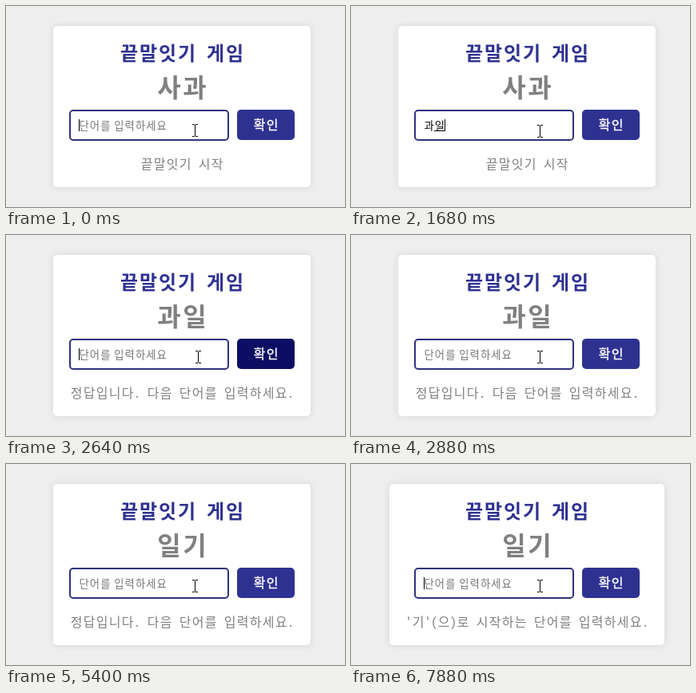
Animation, 424 px wide and 252 px high, one loop 8000 ms. Source, as an HTML page with a canvas:

```html
<!DOCTYPE html>
<html lang="ko">
<head>
<meta charset="utf-8">
<title>끝말잇기 게임</title>
<style>
html, body { margin: 0; width: 100%; height: 100%; overflow: hidden; background: #eee; }
canvas { display: block; }
</style>
</head>
<body>
<canvas id="stage" width="424" height="252"></canvas>
<script>
const ctx = document.getElementById('stage').getContext('2d');
const LOOP = 8000;
const MONO = '"Noto Sans Mono CJK KR", "Noto Sans CJK KR", "Noto Sans CJK", monospace';
const FIELD = '"Liberation Sans", ' + MONO;
const FIELD_SIZE = 40 / 3;
const FIELD_X = 91;
const HANGUL_GAP = 0.08; // em, brings Hangul to a full square
const BLINK = 520;
const NAVY = [47, 49, 145], DARK = [11, 11, 96];
const OK = '정답입니다. 다음 단어를 입력하세요.';

// Input value over time; caret blinking restarts at each entry.
const typing = [
  [0, ''], [360, 'ㄱ'], [480, '고'], [600, '과'], [800, '광'], [960, '과이'], [1200, '과일'],
  [2240, ''],
  [4120, 'ㅇ'], [4240, '이'], [4320, '일'], [4520, '읽'], [4560, '일기'],
  [4880, ''],
  [6320, 'ㅇ'], [6400, '이'], [6960, '일'], [7360, '읽'], [7400, '일기'],
  [7720, '']
];
const words = [[0, '사과'], [2240, '과일'], [4880, '일기']];
const messages = [[0, '끝말잇기 시작'], [2240, OK], [7720, "'기'(으)로 시작하는 단어를 입력하세요."]];

const linear = u => u;
const easeIn = u => u * u * u;
const easeOut = u => u * (2 - u);
const smooth = u => u * u * (3 - 2 * u);

// time, x, y, easing used to get there
const path = [
  [0, 237, 156, linear], [1200, 237, 157, linear], [1680, 237, 157, linear],
  [2040, 306, 152, easeOut], [2520, 306, 152, linear],
  [2640, 241, 153, easeIn], [2880, 237, 153, easeOut], [LOOP, 237, 153, linear]
];

const clamp = v => Math.max(0, Math.min(1, v));
const latest = (list, t) => list.filter(e => e[0] <= t).pop();
const rgb = c => `rgb(${c.map(Math.round).join()})`;

function pointerAt(t) {
  const i = Math.max(1, path.findIndex(p => p[0] > t));
  const [t0, x0, y0] = path[i - 1], [t1, x1, y1, ease] = path[i];
  const k = ease((t - t0) / (t1 - t0));
  return [Math.round(x0 + (x1 - x0) * k), Math.round(y0 + (y1 - y0) * k)];
}

function box(x, y, w, h, r, fill) {
  ctx.beginPath();
  ctx.roundRect(x, y, w, h, r);
  ctx.fillStyle = fill;
  ctx.fill();
}

// Hangul runs are spaced out, other runs keep their natural width.
function text(str, x, y, size, color, { weight = 400, family = MONO, left = false, stroke = 0 } = {}) {
  ctx.font = `${weight} ${size}px ${family}`;
  ctx.fillStyle = ctx.strokeStyle = color;
  ctx.lineWidth = stroke;
  const runs = str.match(/[ㄱ-힣]+|[^ㄱ-힣]+/g).map(run => {
    const gap = /[ㄱ-힣]/.test(run) ? size * HANGUL_GAP : 0;
    ctx.letterSpacing = '0px';
    return { run, gap, width: ctx.measureText(run).width + gap * run.length };
  });
  if (!left) x -= runs.reduce((sum, r) => sum + r.width, 0) / 2;
  for (const { run, gap, width } of runs) {
    ctx.letterSpacing = gap + 'px';
    ctx.fillText(run, x + gap / 2, y);
    if (stroke) ctx.strokeText(run, x + gap / 2, y);
    x += width;
  }
}

function drawCard(w) {
  ctx.save();
  ctx.shadowColor = 'rgba(0,0,0,.1)';
  ctx.shadowBlur = 10;
  box(220 - w / 2, 25, w, 202, 5, '#fff');
  ctx.restore();
}

function drawInput(t) {
  ctx.beginPath();
  ctx.roundRect(80, 131, 198, 37, 4);
  ctx.lineWidth = 2;
  ctx.strokeStyle = '#30317d';
  ctx.stroke();

  const [since, value] = latest(typing, t);
  const focused = t < 2120 || t >= 2240;
  text(value || '단어를 입력하세요', FIELD_X, 155, FIELD_SIZE, value ? '#000' : '#757575',
    { family: FIELD, left: true });
  if (!focused) return;

  const end = FIELD_X + value.length * FIELD_SIZE;
  ctx.fillStyle = '#000';
  if (value) ctx.fillRect(Math.round(end - FIELD_SIZE), 156, 13, 1);
  if (Math.floor((t - since) / BLINK) % 2 === 0 || value) {
    ctx.fillRect(Math.floor(end), 142, 1, 15);
  }
}

function drawButton(t) {
  const k = smooth(clamp((t - 1860) / 200)) - smooth(clamp((t - 2597) / 280));
  box(289, 130, 72, 38, 5, rgb(NAVY.map((c, i) => c + (DARK[i] - c) * k)));
  text('확인', 325, 155, 16, '#fff', { stroke: 0.4 });
}

function drawBeam(x, y) {
  ctx.fillStyle = '#000';
  for (const dy of [-8, 7]) {
    ctx.fillRect(x - 4, y + dy, 3, 1);
    ctx.fillRect(x, y + dy, 3, 1);
  }
  ctx.fillRect(x - 1, y - 7, 1, 14);
}

function drawHand(x, y) {
  ctx.save();
  ctx.translate(x - 6, y);
  const hand = new Path2D('M5 13V2.2Q5 .5 6.5 .5T8 2.2V7.5Q10.5 6.5 11 8.5Q13.4 7.5 14 9.5' +
    'Q16.5 9 16.5 11.5V16L14.5 20V23.5H6V20.5L1 14.5Q-.3 12 .8 11Q2 10 3.3 11.5Z');
  ctx.fillStyle = '#fff';
  ctx.strokeStyle = '#000';
  ctx.lineWidth = 1;
  ctx.lineJoin = 'round';
  ctx.fill(hand);
  ctx.stroke(hand);
  ctx.stroke(new Path2D('M8 7.5V12M11 8.5V12M14 9.5V12.5'));
  ctx.restore();
}

function draw(t) {
  ctx.fillStyle = '#eee';
  ctx.fillRect(0, 0, 424, 252);
  drawCard(t < 7720 ? 322 : 344);
  text('끝말잇기 게임', 220, 68, 24, rgb(NAVY), { weight: 700 });
  text(latest(words, t)[1], 220, 114, 32, '#808080', { weight: 700 });
  drawInput(t);
  drawButton(t);
  text(latest(messages, t)[1], 220, 204, 16, '#808080');
  const [x, y] = pointerAt(t);
  (x >= 289 ? drawHand : drawBeam)(x, y);
}

const start = performance.now();
function tick() {
  draw((performance.now() - start) % LOOP);
  requestAnimationFrame(tick);
}
tick();
</script>
</body>
</html>
```
